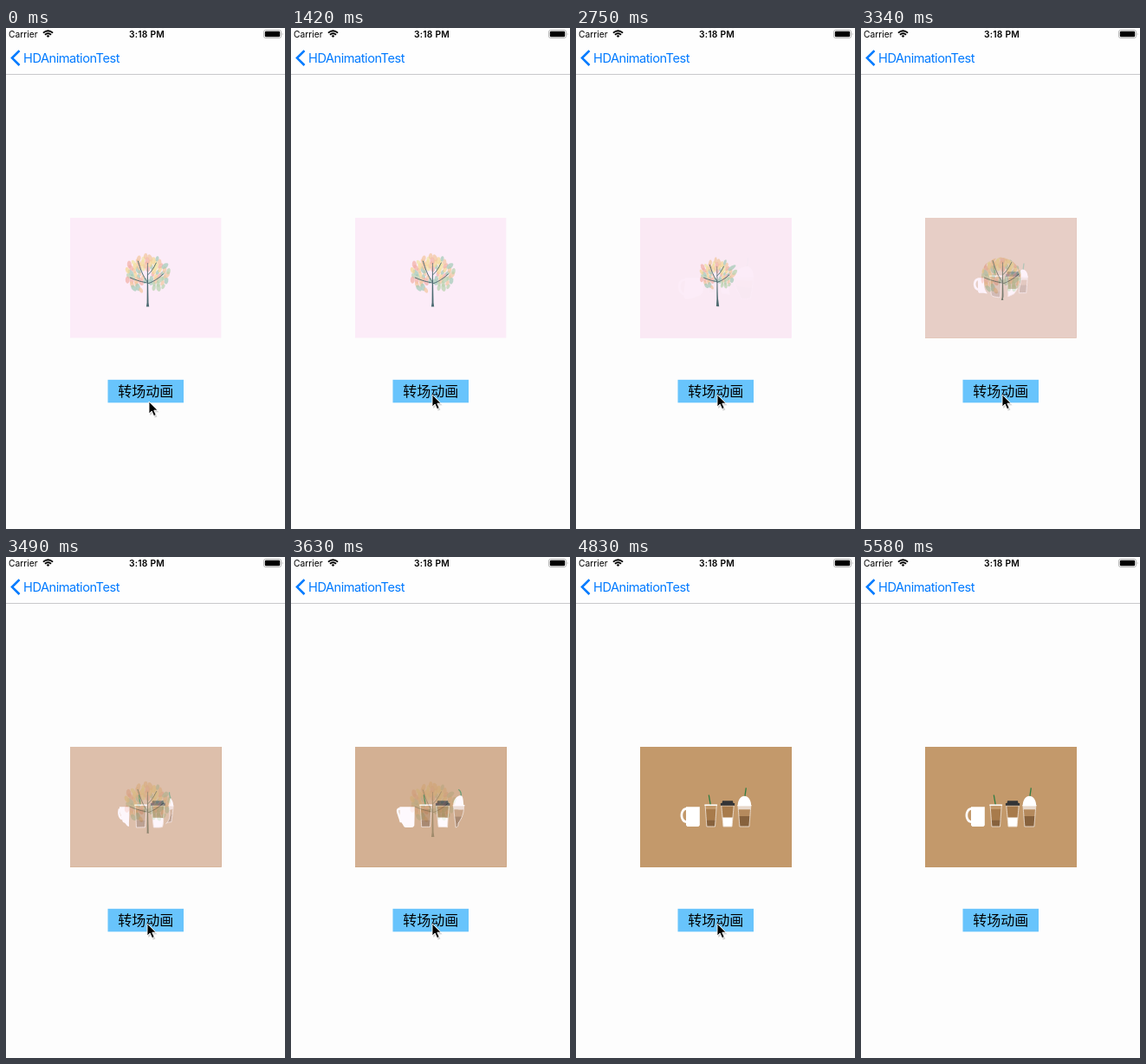
Recreate the animation shown at these times as an HTML page with a canvas. Size 322 by 578 pixels, loop 6.29 s.

```html
<!DOCTYPE html>
<html lang="zh">
<head>
<meta charset="utf-8">
<title>Ripple transition</title>
<style>
  html, body { margin: 0; width: 100%; height: 100%; overflow: hidden; background: #fdfdfd; }
  #stage { position: absolute; left: 0; top: 0; width: 322px; height: 578px; overflow: hidden; }
  svg, canvas { position: absolute; left: 0; top: 0; width: 322px; height: 578px; }
  text { font-family: Inter, "Liberation Sans", sans-serif; }
  .status { font-size: 10.3px; }
  .title { font-size: 14.6px; letter-spacing: -.48px; fill: #007aff; }
  .label { font-family: "Noto Sans CJK SC", "Noto Sans CJK", sans-serif; font-size: 16px; }
</style>
</head>
<body>
<div id="stage">
  <svg viewBox="0 0 322 578">
    <rect width="322" height="53" fill="#fefefe"/>
    <rect y="53" width="322" height="1" fill="#c9c9cb"/>
    <text class="status" x="3" y="11">Carrier</text>
    <text class="status" x="162.5" y="11" text-anchor="middle" font-weight="600" letter-spacing=".2">3:18 PM</text>
    <g fill="none" stroke="#000" stroke-width="1.8">
      <path d="M42.9 5.6Q48.5 .8 54.1 5.6M44.9 7.8Q48.5 4.8 52.1 7.8"/>
      <path d="M46.6 8.9Q48.5 7.6 50.4 8.9L48.5 11Z" fill="#000" stroke="none"/>
    </g>
    <rect x="297.4" y="2.4" width="20.2" height="9.2" rx="2.4" fill="none" stroke="#a6a6a6" stroke-width=".8"/>
    <rect x="298.8" y="3.8" width="17.4" height="6.4" rx="1.2" fill="#000"/>
    <path d="M318.8 5.4q1.6 1.6 0 3.2z" fill="#a6a6a6"/>
    <path d="M15.5 26.2L7 34.6L15.5 43" fill="none" stroke="#007aff" stroke-width="2.6"/>
    <text class="title" x="20.1" y="39.8">HDAnimationTest</text>
    <rect x="117.5" y="405.8" width="87.5" height="26.5" fill="#68c4fc"/>
    <text class="label" x="161.2" y="425.2" text-anchor="middle">转场动画</text>
  </svg>
  <canvas id="view"></canvas>
  <svg viewBox="0 0 322 578">
    <g id="cursor">
      <path d="M.6 1.4V15L3.8 12.2L6.2 17.6L8.8 16.5L6.5 11.3H11Z" fill="#000" opacity=".18" transform="translate(.6 1)"/>
      <path d="M0 0V14L3.2 11L5.6 16.6L8.2 15.5L5.8 10.1H10.2Z" fill="#000" stroke="#fff" stroke-width=".9"/>
    </g>
  </svg>
</div>
<script>
const LOOP = 6290, START = 1420, STEP = 148.6, LAST = 28, FADE_STEP = 9;
const BOX = [74, 219, 174.3, 138.5];
const CX = 161.3, CY = 288.3;
const PI = Math.PI;

const view = document.getElementById("view");
const cursor = document.getElementById("cursor");
const sheet = document.createElement("canvas");
const dpr = window.devicePixelRatio || 1;

function setup(canvas) {
  canvas.width = 322 * dpr;
  canvas.height = 578 * dpr;
  const ctx = canvas.getContext("2d");
  ctx.scale(dpr, dpr);
  return ctx;
}
const out = setup(view), layer = setup(sheet);
let g = out, now = 0;

const mix = (a, b, u) => a + (b - a) * u;
const clamp = (v, lo, hi) => Math.min(hi, Math.max(lo, v));

// one inward wave travelling out from the centre
function ripple(r, step) {
  const p = step - r / 8;
  const envelope = 1 / (1 + ((p - 7.3) / 3) ** 6);
  return 1 - .24 * envelope * Math.tanh(2.5 * Math.sin(PI * (p - 4.8) / 5.4));
}

const fadeAt = step => step < FADE_STEP ? 0 : 1 / (1 + Math.exp((13.8 - step) / 1.3));

function warp([x, y]) {
  const dx = x - CX, dy = y - CY, k = ripple(Math.hypot(dx, dy), now);
  return [CX + dx * k, CY + dy * k];
}

function trace(pts, closed) {
  g.beginPath();
  g.moveTo(...warp(pts[0]));
  const n = closed ? pts.length : pts.length - 1;
  for (let i = 0; i < n; i++) {
    const a = pts[i], b = pts[(i + 1) % pts.length];
    const parts = Math.max(1, Math.ceil(Math.hypot(b[0] - a[0], b[1] - a[1]) / 2));
    for (let j = 1; j <= parts; j++)
      g.lineTo(...warp([mix(a[0], b[0], j / parts), mix(a[1], b[1], j / parts)]));
  }
}

function fill(pts, color) {
  trace(pts, true);
  g.fillStyle = color;
  g.fill();
}

function line(pts, color, width, closed) {
  trace(pts, closed);
  g.strokeStyle = color;
  g.lineWidth = width;
  g.stroke();
}

function arc(x, y, rx, ry, from = 0, to = 2 * PI, tilt = 0) {
  const c = Math.cos(tilt), s = Math.sin(tilt);
  return Array.from({ length: 17 }, (_, i) => {
    const a = mix(from, to, i / 16), px = rx * Math.cos(a), py = ry * Math.sin(a);
    return [x + px * c - py * s, y + px * s + py * c];
  });
}

// a symmetric band between two heights
const band = (x, y1, w1, y2, w2) => [[x - w1, y1], [x + w1, y1], [x + w2, y2], [x - w2, y2]];

function makeLeaves() {
  let seed = 11;
  const rnd = () => (seed = seed * 16807 % 2147483647) / 2147483647;
  const colors = ["#f3e08c", "#f4d894", "#f1e4a4", "#f3b0a8", "#f2c6a0", "#a3cbb9", "#b9d3ae"];
  const leaves = [];
  for (let i = 0; i < 72; i++) {
    const a = i * 2.4, d = Math.sqrt((i + 5) / 77);
    const x = 163 + 25.5 * d * Math.cos(a), y = 284 + 21 * d * Math.sin(a);
    const size = 1.8 + rnd(), tilt = (x - 163) / 45 + rnd() - .5;
    const tone = clamp(rnd() * .75 + (y - 264) / 90, 0, .99);
    if (y > 295 && Math.abs(x - 163) < 7) continue;
    leaves.push([arc(x, y, size, size * 1.7, 0, 2 * PI, tilt), colors[Math.floor(tone * colors.length)]]);
  }
  return leaves;
}
const LEAVES = makeLeaves();

function branch(y, dx, dy) {
  const pts = [0, .25, .5, .75, 1].map(u => [163.3 + dx * u, y + dy * (u + u * u) / 2]);
  line(pts, "#4b6a70", 1);
}

function drawTree() {
  g.fillStyle = "#fcecf8";
  g.fillRect(...BOX);
  g.globalAlpha = .72;
  for (const [shape, color] of LEAVES) fill(shape, color);
  g.globalAlpha = 1;
  g.lineCap = "round";
  branch(294, -20, -6);
  branch(293, -11, -24);
  branch(295, 18, -11);
  branch(285, 10, -14);
  fill([[163, 271], [163.6, 271], [164.5, 317], [165.2, 321.5], [161.9, 321.5], [162.6, 317]], "#4b6a70");
}

// tapered glass with stacked fills: [from, to, color]
function cup(x, y, w, base, layers) {
  const bottom = 311, width = h => mix(w, base, (h - y) / (bottom - y));
  for (const [from, to, color] of layers) fill(band(x, from, width(from), to, width(to)), color);
  line(band(x, y, w, bottom, base), "#eee1d5", .9, true);
}

function drawCups() {
  const white = "#fff", dark = "#87623d", mid = "#a87b4b", straw = "#2f7d43", lid = "#333436";
  g.fillStyle = "#c3996b";
  g.fillRect(...BOX);
  g.lineCap = "butt";

  line(arc(127.5, 298, 5.6, 7.7, PI / 2, PI * 1.5), white, 2.7);
  fill([[127, 288.3], [142.8, 288.3], [142.8, 309.5], [141.3, 311], [128.5, 311], [127, 309.5]], white);

  line([[155.4, 287], [153.3, 274.5]], straw, 1.3);
  cup(155.7, 286.3, 6.6, 4.8, [[291, 303.5, mid], [303.5, 311, dark]]);
  line([[148.3, 286.2], [163.1, 286.2]], white, 1.4);

  cup(175, 287, 7.2, 5, [[287, 301, mid], [300.5, 311, white]]);
  fill(band(175, 281.3, 5.9, 284.2, 6.6), lid);
  fill(band(175, 284, 8.1, 286.7, 8.1), lid);

  line([[194.8, 277], [196.3, 266.3]], straw, 1.3);
  cup(194.4, 287, 7.4, 5.5, [[287, 291.5, "#e7d8cb"], [291.5, 299, "#b58a5d"], [299, 311, dark]]);
  fill(arc(194.4, 286.3, 7.7, 10.6, PI, 2 * PI), white);
  line([[186.3, 286.6], [202.5, 286.6]], white, 1.3);
}

function drawPicture(step) {
  now = step;
  g = out;
  drawTree();
  const fade = fadeAt(step);
  if (!fade) return;
  g = layer;
  drawCups();
  out.globalAlpha = fade;
  out.drawImage(sheet, 0, 0, 322, 578);
  out.globalAlpha = 1;
}

// two small moves onto the button, later an accelerating exit
function moveCursor(t) {
  const enter = clamp(Math.floor((t - 90) / 150), 0, 2);
  const leave = Math.max(0, Math.floor((t - 4830) / 150));
  const x = 165 - enter + 6.75 * leave ** 2;
  const y = 431 - 4 * enter + 8 * leave ** 2;
  cursor.setAttribute("transform", `translate(${x} ${y})`);
  cursor.setAttribute("visibility", leave > 4 ? "hidden" : "visible");
}

let shown = -1;
const begin = performance.now();

function tick() {
  const t = Math.max(0, performance.now() - begin) % LOOP;
  const step = clamp(Math.floor((t - START + 20) / STEP), 0, LAST);
  if (step !== shown) drawPicture(shown = step);
  moveCursor(t);
  requestAnimationFrame(tick);
}
tick();
</script>
</body>
</html>
```
